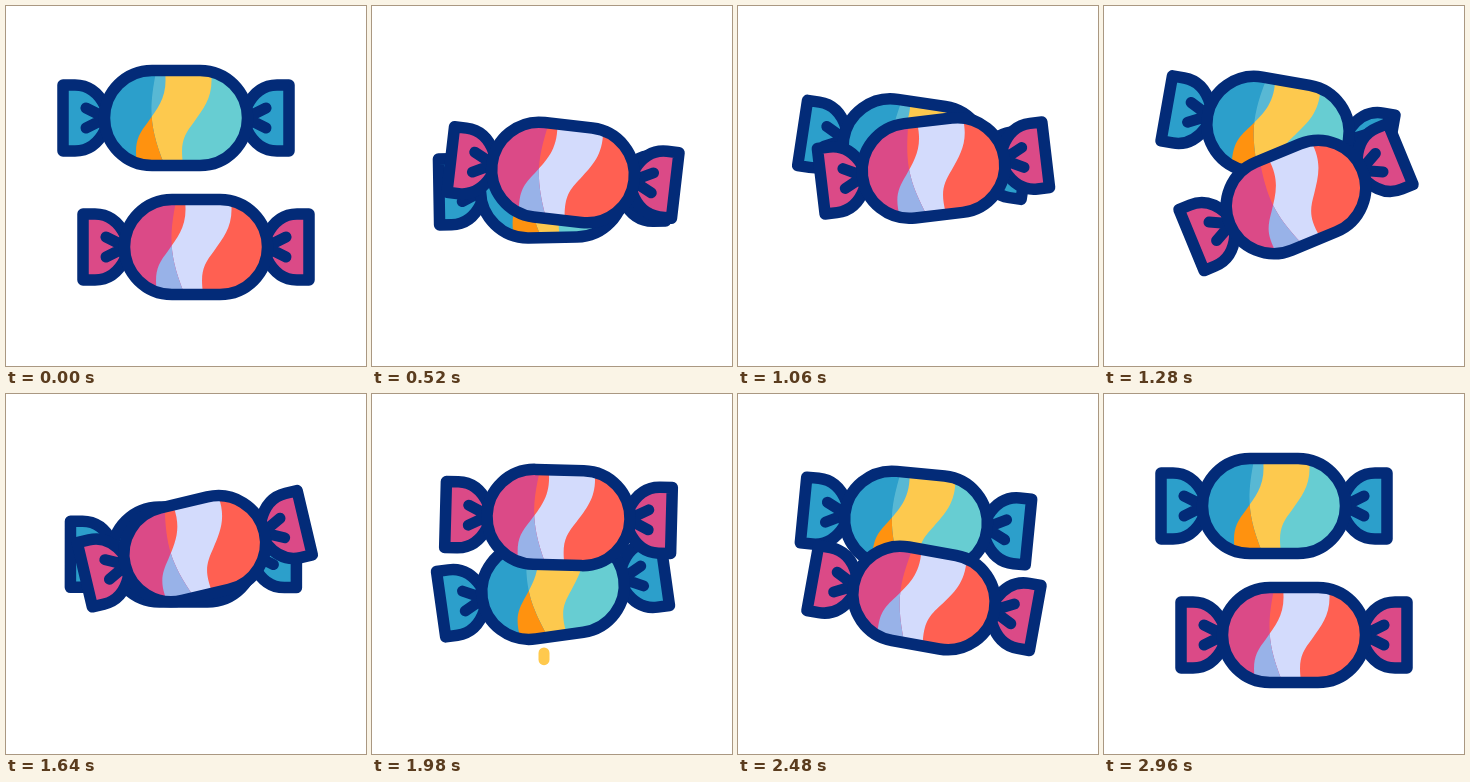
These frames come from a looping animation (360x360 px, 3020 ms). An HTML page with a canvas:

```html
<!DOCTYPE html>
<html lang="en">
<head>
<meta charset="utf-8">
<title>Candies</title>
<style>
html, body { margin: 0; width: 100%; height: 100%; overflow: hidden; background: #fff; }
canvas { display: block; width: 360px; height: 360px; }
</style>
</head>
<body>
<canvas id="stage"></canvas>
<script>
const LOOP = 3020, STEP = 20, NAVY = '#032b78', GOLD = '#ffc94d';
const canvas = document.getElementById('stage');
const ctx = canvas.getContext('2d');
const ratio = window.devicePixelRatio || 1;
canvas.width = canvas.height = 360 * ratio;

// both candies share the beats; each pose is x, y, degrees
const beats = [220, 520, 820, 1280, 1980, 2480, 2900];

const teal = {
  left: '#2c9fcb', band: '#58b8d4', right: '#67cdd2', stripe: '#fdc94e', shade: '#ff920f',
  rest: [170, 112, 0],
  moves: [[180, 184, -1], [180, 180, 4], [174, 122, 10], [181, 194.5, -8], [178, 127, 5.6]]
};
const pink = {
  left: '#db4a87', band: '#ff6052', right: '#ff6052', stripe: '#d3dbfc', shade: '#98b2e8',
  rest: [190, 241, 0],
  moves: [[191, 166.5, 6.6], [198, 125, 14.2], [192, 191, -22.4], [186.5, 123.5, 1.5], [186, 204, 10.2]]
};
for (const candy of [teal, pink]) candy.poses = [candy.rest, ...candy.moves, candy.rest];

const bursts = [
  { x: 265, y: 103, angle: -60, start: 680 },
  { x: 172, y: 227, angle: 90, start: 1945 }
];

const wing = new Path2D('M-113-33H-101C-87-33-77-24-71-12V12C-77 24-87 33-101 33H-113Z');
const folds = new Path2D('M-90-10L-70 0L-90 10');
const wave = new Path2D('M35-46C38-22 28-10 18 4C8 17 4 24 7 46H120V-46Z');
const dark = new Path2D('M-80-46H-20C-27-10-27 8-12 46H-80Z');
const body = new Path2D();
body.roundRect(-71.5, -47.5, 143, 95, 47.5);

const clamp = v => Math.max(0, Math.min(1, v));

function slope(poses, i, c) {
  if (i === 0 || i === beats.length - 1) return 0;
  return (poses[i + 1][c] - poses[i - 1][c]) / (beats[i + 1] - beats[i - 1]);
}

// smooth curve through the poses
function poseAt(poses, time) {
  let i = 0;
  while (i < beats.length - 2 && time > beats[i + 1]) i++;
  const span = beats[i + 1] - beats[i];
  const u = clamp((time - beats[i]) / span), w = 1 - u;
  return [0, 1, 2].map(c =>
    poses[i][c] * w * w * (1 + 2 * u) + poses[i + 1][c] * u * u * (3 - 2 * u) +
    span * u * w * (w * slope(poses, i, c) - u * slope(poses, i + 1, c)));
}

function paint(path, color) {
  ctx.fillStyle = color;
  ctx.fill(path);
}

function outline(path, width) {
  ctx.strokeStyle = NAVY;
  ctx.lineWidth = width;
  ctx.stroke(path);
}

// the stripe lies between two copies of one wave
function drawWrap(before, stripe, after) {
  paint(body, before);
  ctx.translate(-46, 0);
  paint(wave, stripe);
  ctx.translate(46, 0);
  paint(wave, after);
}

function drawCandy(candy, time) {
  const [x, y, angle] = poseAt(candy.poses, time);
  ctx.save();
  ctx.translate(x, y);
  ctx.rotate(angle * Math.PI / 180);
  for (const side of [1, -1]) {
    ctx.save();
    ctx.scale(side, 1);
    paint(wing, candy.left);
    outline(wing, 11.5);
    outline(folds, 11);
    ctx.restore();
  }
  ctx.save();
  ctx.clip(body);
  drawWrap(candy.band, candy.stripe, candy.right);
  ctx.clip(dark);
  drawWrap(candy.left, candy.shade, candy.right);
  ctx.restore();
  outline(body, 11.5);
  ctx.restore();
}

// three rays grow outward, then shrink toward their tips
function drawBurst(burst, time) {
  ctx.strokeStyle = GOLD;
  ctx.lineWidth = 11;
  for (const side of [-1, 0, 1]) {
    const far = Math.abs(side), age = time - burst.start - 40 * far;
    if (age < 0 || age >= 220) continue;
    const inner = 32 + 6 * far;
    const head = inner + 19 * clamp(age / 100);
    const tail = inner + 19 * clamp((age - 110) / 100);
    ctx.save();
    ctx.translate(burst.x, burst.y);
    ctx.rotate((burst.angle + 40 * side) * Math.PI / 180);
    ctx.beginPath();
    ctx.moveTo(tail, 0);
    ctx.lineTo(head + 0.01, 0);
    ctx.stroke();
    ctx.restore();
  }
}

function render(time) {
  ctx.setTransform(ratio, 0, 0, ratio, 0, 0);
  ctx.fillStyle = '#fff';
  ctx.fillRect(0, 0, 360, 360);
  ctx.lineCap = ctx.lineJoin = 'round';
  drawCandy(teal, time);
  drawCandy(pink, time);
  bursts.forEach(burst => drawBurst(burst, time));
}

const begin = performance.now();
function tick() {
  const time = (performance.now() - begin) % LOOP;
  render(Math.floor(time / STEP) * STEP);
  requestAnimationFrame(tick);
}
tick();
</script>
</body>
</html>
```
